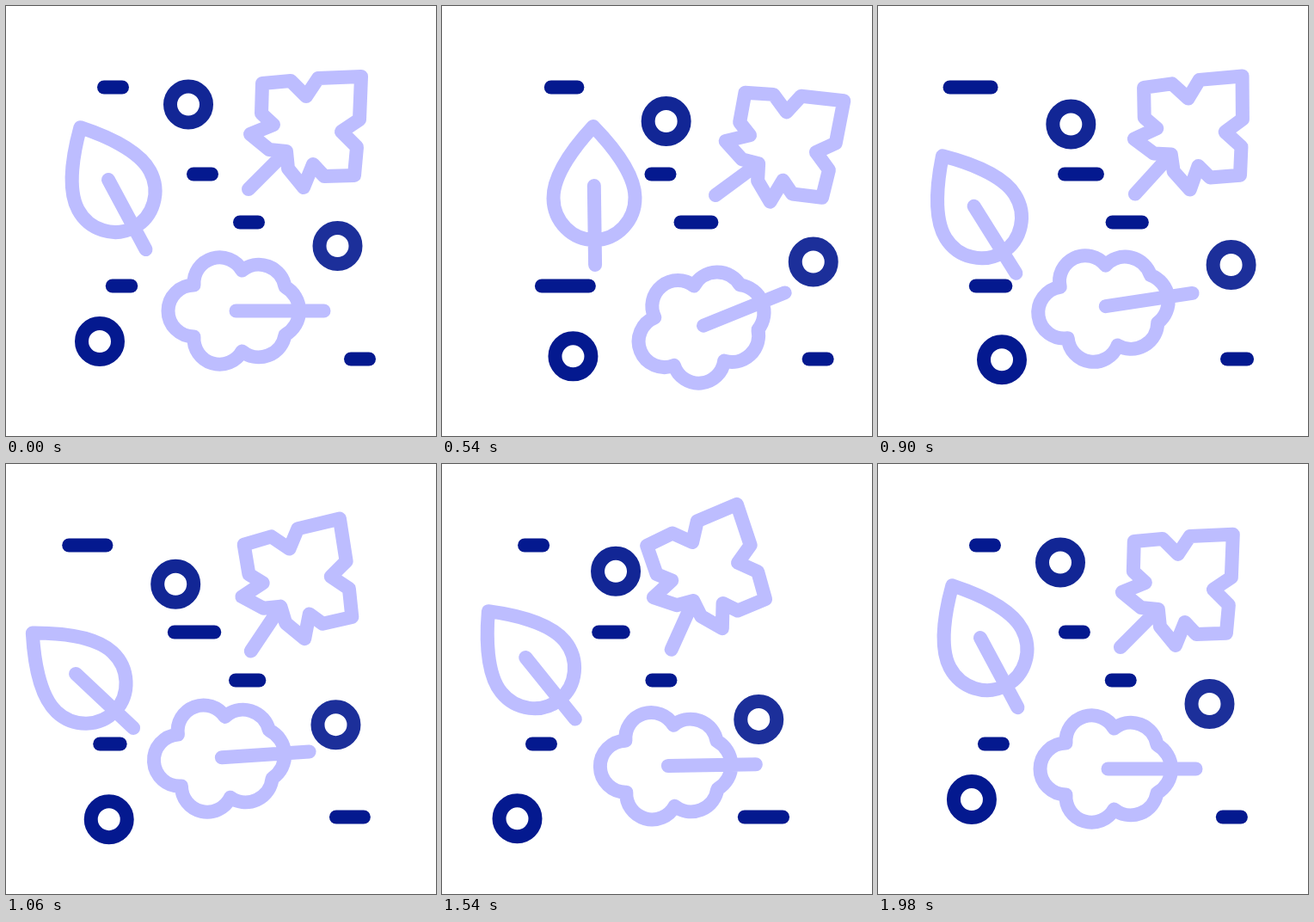
Write an HTML page that moves like this. It is 500 px wide and 500 px high and loops after 2 s.

```html
<!DOCTYPE html>
<html lang="en">
<head>
<meta charset="utf-8">
<title>Drifting leaves</title>
<style>
html, body { margin: 0; width: 100%; height: 100%; overflow: hidden; background: #fff; }
svg { display: block; width: 100%; height: 100%; }
svg * { fill: none; stroke-width: 16; stroke-linecap: round; stroke-linejoin: round; }
.leaf { stroke: #bdbdff; }
.dark { stroke: #04198f; }
</style>
</head>
<body>
<svg viewBox="0 0 500 500"></svg>
<script>
const LOOP = 2000;
const svg = document.querySelector('svg');

function add(tag, cls, attrs) {
  const el = document.createElementNS('http://www.w3.org/2000/svg', tag);
  el.setAttribute('class', cls);
  set(el, attrs);
  return svg.appendChild(el);
}

function set(el, attrs) {
  for (const name in attrs) el.setAttribute(name, attrs[name]);
}

const clamp = u => Math.min(1, Math.max(0, u));
const ease = u => u * u * (3 - 2 * u);

// Eased trip from rest to the gust, on to the drift, and back to rest.
function trip(t, [t1, t2, t3 = LOOP], gust, drift) {
  const a = ease(clamp(t / t1));
  const b = ease(clamp((t - t1) / (t2 - t1)));
  const c = ease(clamp((t - t2) / (t3 - t2)));
  return gust.map((g, i) => g * (a - b) + drift[i] * (b - c));
}

// Poses are [x, y, rotation] relative to rest.
function leaf(d, x, y, angle, times, gust, drift) {
  const el = add('path', 'leaf', { d });
  return t => {
    const [dx, dy, turn] = trip(t, times, gust, drift);
    set(el, { transform: `translate(${x + dx} ${y + dy}) rotate(${angle + turn})` });
  };
}

// All rings fly the same path, each at its own pace.
function ring(x, y, step, opacity) {
  const el = add('circle', 'dark', { r: 21, 'stroke-opacity': opacity });
  const times = [step, 2 * step, Math.min(3 * step, LOOP)];
  return t => {
    const [dx, dy] = trip(t, times, [50, 20], [-25, 26]);
    set(el, { cx: x + dx, cy: y + dy });
  };
}

// A dash slides sideways and grows by `stretch` around the time `peak`.
function dash(x, y, times, gust, drift, peak, stretch) {
  const el = add('line', 'dark', { y1: y, y2: y });
  return t => {
    const [dx] = trip(t, times, [gust], [drift]);
    const swell = ease(clamp(1 - Math.abs(t - peak) / 600));
    const reach = (21 + stretch * swell) / 2;
    set(el, { x1: x + dx - reach, x2: x + dx + reach });
  };
}

// One half of the maple outline; the other is its mirror across the stem.
const half = [[44, -44], [24, -46], [2, -64], [29, -75], [15, -88], [16, -123],
  [49, -126], [67, -108], [81, -129], [131, -131]];
const mirrored = half.map(([x, y]) => [-y, -x]).reverse();
const maple = `M${[...half, ...mirrored].join('L')}ZM0 0L44 -44`;

const drop = 'M0-69C20-48 47.5-14 47.5 14A47.5 49 0 0 1-47.5 14C-47.5-14-20-48 0-69ZM0 0V92';

const oak = 'M-49 30A30 30 0 0 1-49-30A30 30 0 0 1 7-47A31 31 0 0 1 57-28' +
  'A32 32 0 0 1 57 28A31 31 0 0 1 7 47A30 30 0 0 1-49 30ZM0 0H102';

const parts = [
  leaf(drop, 119, 202, -28.2, [560, 1120], [58, 7, 27.5], [-41, 43, -20]),
  leaf(maple, 282, 213, 0, [540, 1430], [36, 7, 8.7], [-17, 3, -23]),
  leaf(oak, 267.5, 354.5, 0, [480, 1120, 1750], [38, 18, -22.5], [-18, -14, -3.4]),

  ring(212, 114.5, 600, 0.94),
  ring(385.5, 279, 650, 0.9),
  ring(109, 390, 700, 1),

  dash(124.5, 94.5, [450, 1150], 20, -32, 900, 27),
  dash(228.5, 195.5, [590, 1440], 26, -35, 1150, 27),
  dash(282.5, 251.5, [650, 1650], 14, -29, 700, 18),
  dash(134.5, 325.5, [580, 1350], 9, -24, 560, 34),
  dash(411.5, 410.5, [580, 1460], 26, -40, 1400, 27)
];

function frame() {
  const t = performance.now() % LOOP;
  parts.forEach(pose => pose(t));
  requestAnimationFrame(frame);
}
frame();
</script>
</body>
</html>
```
